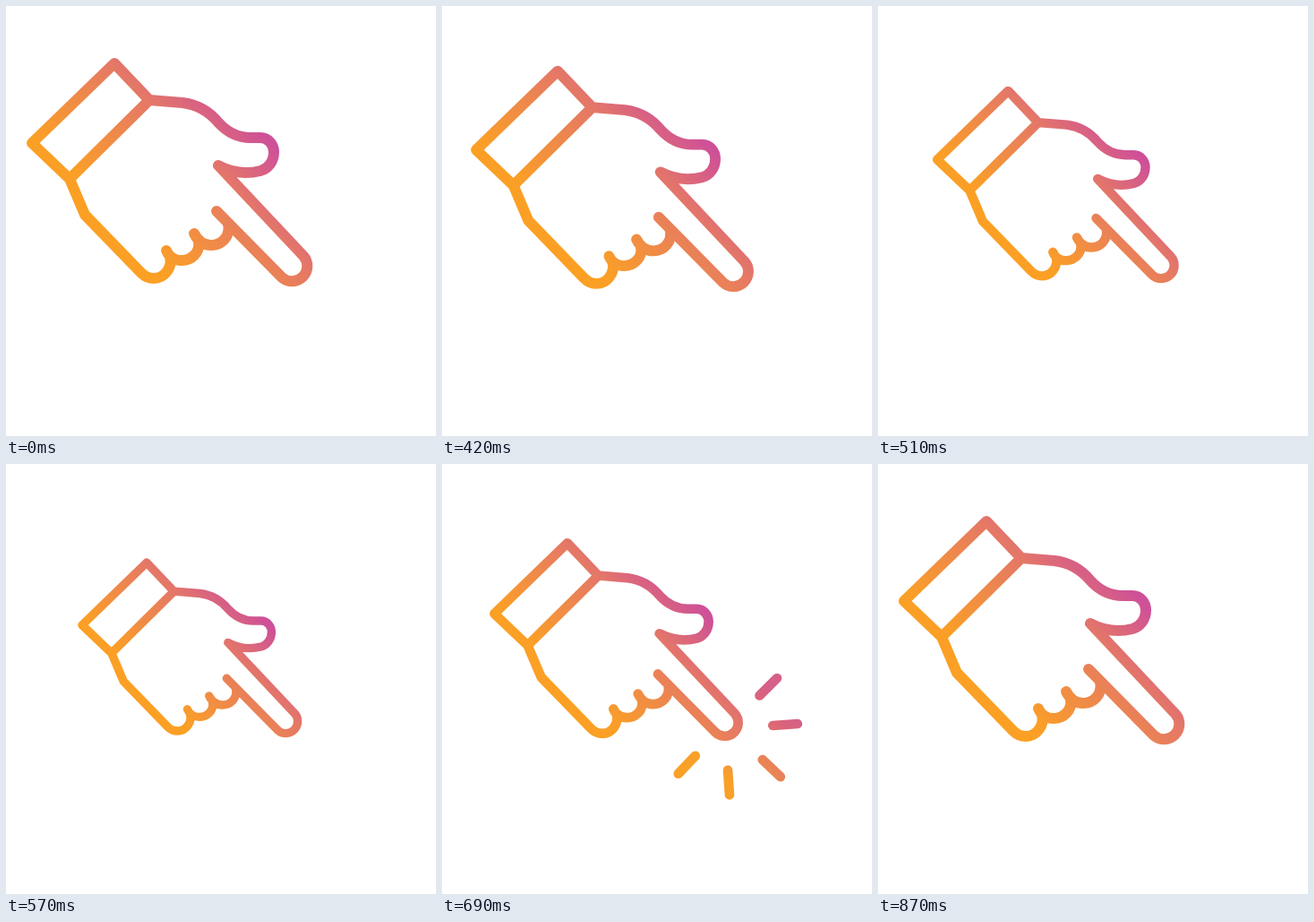
These frames come from a looping animation (480 by 480 pixels, 1290 ms). An HTML page with a canvas:

```html
<!DOCTYPE html>
<html lang="en">
<head>
<meta charset="utf-8">
<title>Tap</title>
<style>
html, body { margin: 0; height: 100%; overflow: hidden; background: #fff; }
canvas { display: block; width: 480px; height: 480px; }
</style>
</head>
<body>
<canvas id="stage" width="480" height="480"></canvas>
<script>
const ctx = document.getElementById('stage').getContext('2d');
const LOOP = 1290, STEP = 30;
const PIVOT = { x: 287, y: 276.5 };
const TIP = { x: 316, y: 294 };

const hand = new Path2D(
  // cuff
  'M121 64L29 153L71 193L160 105Z' +
  // thumb and pointing finger
  'M160 105L197 108C213 110 227 118 237 130C247 141 259 147 273 147L284 147' +
  'C293 147 299 155 299 163C299 174 292 182 284 184C268 188 252 186 237 178' +
  'L332 279A17 17 0 0 1 308 303L235 229' +
  // curled fingers and wrist
  'M248 243C251 258 240 267 229 267C220 267 214 262 210 254' +
  'M215 263C217 275 207 284 196 284C188 284 182 280 179 273' +
  'M183 280C186 292 177 304 165 304C159 304 155 302 151 298L88 233L71 193');

// start point and direction in degrees
const rays = [
  [344, 269, -45], [354.5, 293, -4], [347, 320, 43.5], [318, 327, 86], [293, 315, 133.5]
];

// gradient running up and to the right, offsets measured from a centre
function ramp(cx, cy, from, to, stops) {
  const nx = 0.726, ny = -0.687;
  const g = ctx.createLinearGradient(
    cx + nx * from, cy + ny * from, cx + nx * to, cy + ny * to);
  stops.forEach(([at, color]) => g.addColorStop(at, color));
  return g;
}

const handPaint = ramp(0, 0, -90, 110,
  [[0, '#fba024'], [0.1, '#fa9e28'], [0.67, '#e47768'], [1, '#ce5098']]);

const clamp = v => Math.min(1, Math.max(0, v));
const span = (t, a, b) => clamp((t - a) / (b - a));
const ease = (t, a, b) => (1 - Math.cos(Math.PI * span(t, a, b))) / 2;

function drawHand(t) {
  const s = 1 - 0.228 * (ease(t, 390, 600) - ease(t, 600, 780));
  const shift = 6.3 * (ease(t, 330, 410) - ease(t, 410, 550));
  ctx.save();
  ctx.translate(PIVOT.x * (1 - s) + shift, PIVOT.y * (1 - s) + shift);
  ctx.scale(s, s);
  ctx.strokeStyle = handPaint;
  ctx.lineWidth = 12;
  ctx.stroke(hand);
  ctx.restore();
}

function drawRays(t) {
  if (t < 600 || t >= 870) return;
  const travel = 57.6 * (1 - Math.pow(1 - span(t, 570, 870), 2.6)) - 25.3;
  const k = 1 + travel / 60;
  ctx.strokeStyle = ramp(TIP.x, TIP.y, -30 * k, 52 * k,
    [[0, '#f9a028'], [0.44, '#e88258'], [0.85, '#d9627c'], [1, '#d6608a']]);
  ctx.lineWidth = 10 + travel * 0.04;
  ctx.beginPath();
  for (const [x, y, deg] of rays) {
    const dx = Math.cos(deg * Math.PI / 180), dy = Math.sin(deg * Math.PI / 180);
    const near = travel * 0.87, far = 25.4 + travel;
    ctx.moveTo(x + dx * near, y + dy * near);
    ctx.lineTo(x + dx * far, y + dy * far);
  }
  ctx.stroke();
}

function draw(now) {
  const t = Math.floor((now % LOOP) / STEP) * STEP;
  ctx.fillStyle = '#fff';
  ctx.fillRect(0, 0, 480, 480);
  ctx.lineCap = ctx.lineJoin = 'round';
  drawRays(t);
  drawHand(t);
}

let start;
function tick(now) {
  if (start === undefined) start = now;
  draw(now - start);
  requestAnimationFrame(tick);
}
draw(0);
requestAnimationFrame(tick);
</script>
</body>
</html>
```
